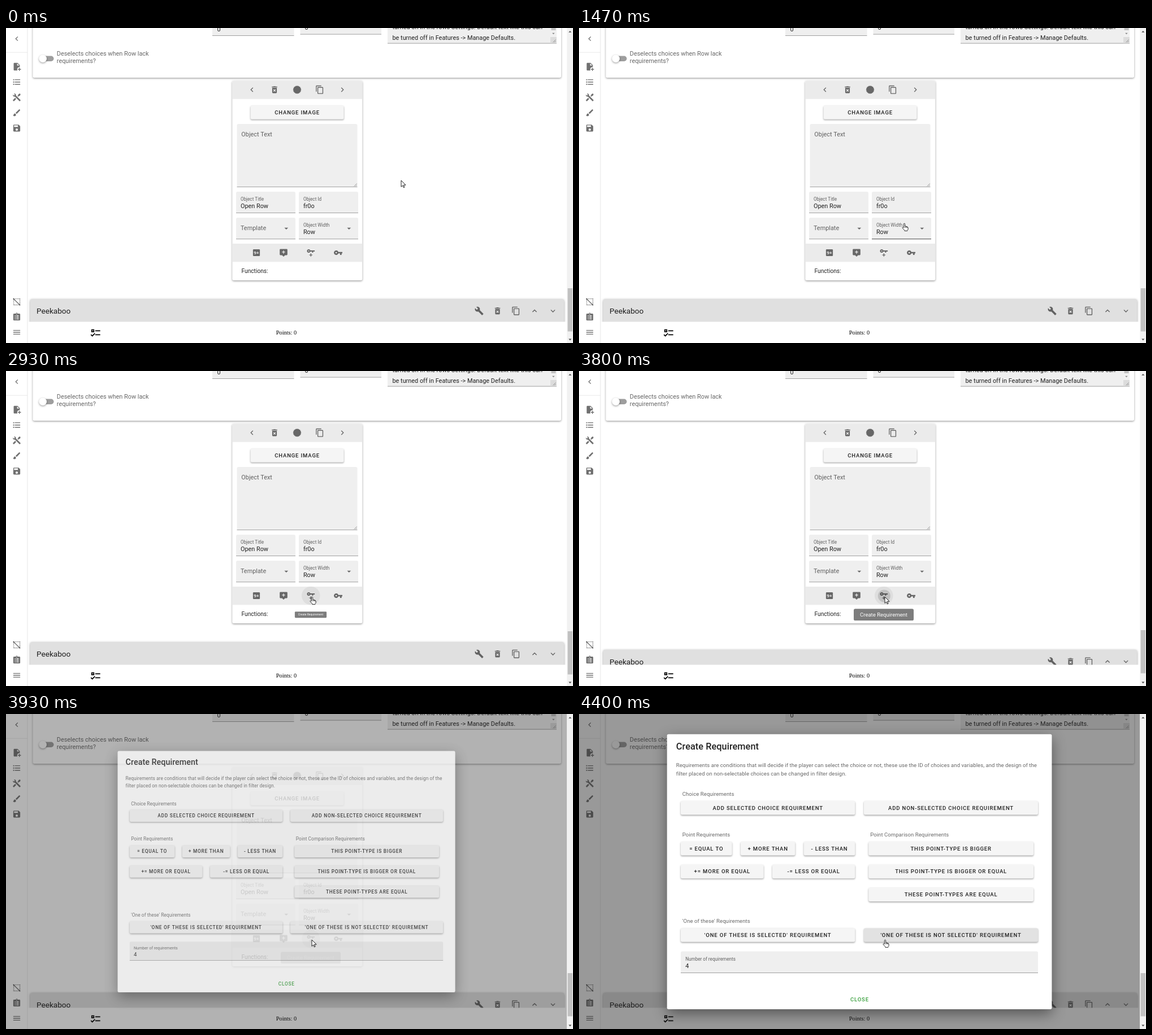
An HTML page with a canvas that plays this animation: 1003x558 px, repeating every 5990 ms.

```html
<!DOCTYPE html>
<html lang="en">
<head>
<meta charset="utf-8">
<title>Create Requirement</title>
<style>
html, body { margin: 0; width: 100%; height: 100%; overflow: hidden; background: #fff; }
canvas { display: block; width: 1003px; height: 558px; }
</style>
</head>
<body>
<canvas id="stage" width="1003" height="558"></canvas>
<script>
const W = 1003, H = 558, LOOP = 5990, STEP = 66.55;
const ROBOTO = 'Roboto, Arial, sans-serif';
const SERIF = '"Liberation Serif", "Times New Roman", serif';
const INK = 'rgba(0,0,0,.87)', SOFT = 'rgba(0,0,0,.6)', ICON = 'rgba(0,0,0,.56)';
const LINE = 'rgba(0,0,0,.42)', FIELD = '#efefef', BAR = '#ebebeb';
const BODY = 10.88, SMALL = 8.16, NOTE = 9.52;

const screen = document.getElementById('stage').getContext('2d');
const layer = document.createElement('canvas');
layer.width = W;
layer.height = H;
const layerCtx = layer.getContext('2d');
let g = screen;

const icons = {
  left: 'M15.4 16.6L10.8 12 15.4 7.4 14 6 8 12 14 18Z',
  right: 'M8.6 16.6L13.2 12 8.6 7.4 10 6 16 12 10 18Z',
  up: 'M7.4 15.4L12 10.8 16.6 15.4 18 14 12 8 6 14Z',
  down: 'M7.4 8.6L12 13.2 16.6 8.6 18 10 12 16 6 10Z',
  drop: 'M7 10L12 15 17 10Z',
  trash: 'M6 19A2 2 0 0 0 8 21H16A2 2 0 0 0 18 19V7H6ZM8.5 11.9L9.9 10.5 12 12.6 14.1 10.5 15.5 11.9 13.4 14 15.5 16.1 14.1 17.5 12 15.4 9.9 17.5 8.5 16.1 10.6 14ZM15.5 4L14.5 3H9.5L8.5 4H5V6H19V4Z',
  copy: 'M19 21H8V7H19ZM19 5H8A2 2 0 0 0 6 7V21A2 2 0 0 0 8 23H19A2 2 0 0 0 21 21V7A2 2 0 0 0 19 5ZM16 1H4A2 2 0 0 0 2 3V17H4V3H16Z',
  wrench: 'M22.7 19L13.6 9.9C14.5 7.6 14 4.9 12.1 3 10.1 1 7.1.6 4.7 1.7L9 6 6 9 1.6 4.7C.4 7.1.9 10.1 2.9 12.1 4.8 14 7.5 14.5 9.8 13.6L18.9 22.7Q19.6 23.3 20.3 22.7L22.6 20.4Q23.3 19.7 22.7 19Z',
  file: 'M14 2H6A2 2 0 0 0 4 4V20A2 2 0 0 0 6 22H13.8A6 6 0 0 1 20 13.1V8ZM13 9V3.5L18.5 9ZM23 20H20V23H18V20H15V18H18V15H20V18H23Z',
  list: 'M7 5H21V7H7ZM7 11H21V13H7ZM7 17H21V19H7ZM2.6 4.6H5.4V7.4H2.6ZM2.6 10.6H5.4V13.4H2.6ZM2.6 16.6H5.4V19.4H2.6Z',
  tools: 'M21.7 20.3L20.3 21.7A1 1 0 0 1 18.9 21.7L7 9.9A4 4 0 0 1 2.2 4.7L4.8 7.2 7.2 4.8 4.7 2.2A4 4 0 0 1 9.9 7L21.7 18.9A1 1 0 0 1 21.7 20.3ZM2.3 18.9A1 1 0 0 0 2.3 20.3L3.7 21.7A1 1 0 0 0 5.1 21.7L10.6 16.2 7.8 13.4ZM20 2L16 4V6L13.8 8.2 15.8 10.2 18 8H20L22 4Z',
  brush: 'M20.7 4.6L19.4 3.3Q18.7 2.6 18 3.3L9 12.3 11.8 15 20.7 6Q21.3 5.3 20.7 4.6ZM7 14A3 3 0 0 0 4 17C4 18.3 2.8 19 2 19 2.9 20.2 4.5 21 6 21A4 4 0 0 0 10 17A3 3 0 0 0 7 14Z',
  save: 'M15 9H5V5H15ZM12 19A3 3 0 0 1 12 13A3 3 0 0 1 12 19ZM17 3H5A2 2 0 0 0 3 5V19A2 2 0 0 0 5 21H19A2 2 0 0 0 21 19V7Z',
  board: 'M19 3H14.8A3 3 0 0 0 9.2 3H5A2 2 0 0 0 3 5V19A2 2 0 0 0 5 21H19A2 2 0 0 0 21 19V5A2 2 0 0 0 19 3ZM11 3H13V5H11ZM7 8H9V10H7ZM11 8H17V10H11ZM7 12H9V14H7ZM11 12H17V14H11ZM7 16H9V18H7ZM11 16H17V18H11Z',
  menu: 'M3 6H21V8H3ZM3 11H21V13H3ZM3 16H21V18H3Z',
  checks: 'M3 5H9V11H3ZM5 7V9H7V7ZM11 7H21V9H11ZM11 15H21V17H11ZM5 20L1.5 16.5 2.9 15.1 5 17.2 9.6 12.6 11 14Z',
  box: 'M5 3H19A2 2 0 0 1 21 5V19A2 2 0 0 1 19 21H5A2 2 0 0 1 3 19V5A2 2 0 0 1 5 3Z',
  note: 'M4 2H20A2 2 0 0 1 22 4V16A2 2 0 0 1 20 18H16L12 22 8 18H4A2 2 0 0 1 2 16V4A2 2 0 0 1 4 2ZM11 6V9H8V11H11V14H13V11H16V9H13V6Z',
  keyPlus: 'M6.5 3A4.5 4.5 0 0 1 10.7 6H22V9H18V12H15V9H10.7A4.5 4.5 0 1 1 6.5 3ZM6.5 6A1.5 1.5 0 0 0 6.5 9A1.5 1.5 0 0 0 6.5 6ZM8 17H11V14H13V17H16V19H13V22H11V19H8Z',
  key: 'M7 14A2 2 0 0 1 7 10A2 2 0 0 1 7 14ZM12.7 10A6 6 0 1 0 12.7 14H17V18H21V14H23V10Z'
};
for (const name in icons) icons[name] = new Path2D(icons[name]);

const arrow = new Path2D('M0 0V17L4 13.3 6.5 19 9 18 6.5 12.2H12Z');
const hand = new Path2D('M5 12V2.5a1.8 1.8 0 0 1 3.6 0V8.5q3.2-.8 3.4 1.2q2.8-.6 3 1.4q2.4-.2 2.4 2v3.5q0 2.5-2 4V22H7.5v-1.5L2 14.5q-1.6-2.2.2-3q1.5-.4 2.8 1.5Z');

// step, x, y of the pointer
const path = [
  [12, 699, 270], [13, 697, 270], [14, 688, 268], [15, 671, 265], [17, 624, 264],
  [18, 610, 267], [19, 601, 277], [20, 593, 298], [21, 584, 325], [22, 575, 346],
  [24, 559, 377], [25, 553, 388], [26, 548, 394], [27, 544, 398], [29, 541, 400]
];

// y is the middle of the capitals
function text(s, x, y, size, color = INK, o = {}) {
  g.font = `${o.weight || 400} ${size}px ${o.font || ROBOTO}`;
  g.letterSpacing = (o.space || 0) + 'px';
  g.textAlign = o.align || 'left';
  g.fillStyle = color;
  g.fillText(s, x, y + size * .356);
}

function rect(x1, y1, x2, y2, color) {
  g.fillStyle = color;
  g.fillRect(x1, y1, x2 - x1, y2 - y1);
}

function panel(x1, y1, x2, y2, color, r = 2.7, blur = 0, drop = 0, dark = .35) {
  g.save();
  if (blur) {
    g.shadowColor = `rgba(0,0,0,${dark})`;
    g.shadowBlur = blur;
    g.shadowOffsetY = drop;
  }
  g.fillStyle = color;
  g.beginPath();
  g.roundRect(x1, y1, x2 - x1, y2 - y1, r);
  g.fill();
  g.restore();
}

function disc(x, y, r, color) {
  g.fillStyle = color;
  g.beginPath();
  g.arc(x, y, r, 0, 7);
  g.fill();
}

function icon(name, x, y, color = ICON, size = 16.32) {
  g.save();
  g.translate(x, y);
  g.scale(size / 24, size / 24);
  g.translate(-12, -12);
  g.fillStyle = color;
  g.fill(icons[name], 'evenodd');
  g.restore();
}

function button(s, x1, x2, y, color = '#f5f5f5') {
  panel(x1, y - 12.2, x2, y + 12.2, color, 2.7, 3, 1.4, .36);
  text(s, (x1 + x2) / 2, y, NOTE, INK, { weight: 500, space: .85, align: 'center' });
}

function field(x1, y1, x2, y2, hot) {
  panel(x1, y1, x2, y2, FIELD, [2.7, 2.7, 0, 0]);
  rect(x1, y2 - .8, x2, y2, hot ? INK : LINE);
}

function grip(x, y) {
  g.strokeStyle = '#777';
  g.lineWidth = .7;
  g.beginPath();
  for (const d of [5, 2.5]) {
    g.moveTo(x - d, y);
    g.lineTo(x, y - d);
  }
  g.stroke();
}

function triangle(x, y, w, h, color) {
  g.fillStyle = color;
  g.beginPath();
  g.moveTo(x - w, y - h);
  g.lineTo(x + w, y - h);
  g.lineTo(x, y + h);
  g.fill();
}

function sidebar() {
  rect(0, 0, 38, H, '#fff');
  rect(37.6, 0, 38.3, H, '#dcdcdc');
  rect(0, 42.8, 38, 43.5, '#e0e0e0');
  icon('left', 19, 19);
  ['file', 'list', 'tools', 'brush', 'save'].forEach((n, i) => icon(n, 19, 68.5 + i * 27.2));
  g.strokeStyle = ICON;
  g.lineWidth = 1.4;
  g.setLineDash([1.4, 1.32]);
  g.strokeRect(13.6, 479.6, 10.9, 10.9);
  g.setLineDash([]);
  g.beginPath();
  g.moveTo(12.7, 479);
  g.lineTo(25, 491.3);
  g.stroke();
  icon('board', 19, 512);
  icon('menu', 19, 539);
}

function topSheet() {
  panel(47.5, -20, 982, 88, '#fff', 2.7, 3.5, 1.3, .4);
  field(365, -20, 509.5, 14);
  field(520.5, -20, 664, 11.5);
  text('0', 373.5, 2.2, BODY);
  text('0', 528.5, -.8, BODY);
  field(675, -20, 974, 27.5);
  text('turned on in the rows Settings. Default text like this can', 683.5, -1.8, BODY);
  text('be turned off in Features -> Manage Defaults.', 683.5, 17.3, BODY);
  rect(963, 0, 974, 16, '#f1f1f1');
  rect(964.5, 0, 972.5, 4, '#c1c1c1');
  triangle(968.4, 10, 2.3, 1.2, '#888');
  rect(963, 16, 974, 26.7, '#dcdcdc');
  grip(972.5, 25.5);
  panel(62, 49.5, 84.5, 59, '#9e9e9e', 4.7);
  g.save();
  g.shadowColor = 'rgba(0,0,0,.4)';
  g.shadowBlur = 3.5;
  g.shadowOffsetY = 1.3;
  disc(65.2, 54.2, 6.8, '#fff');
  g.restore();
  text('Deselects choices when Row lack', 89.8, 44.7, BODY, SOFT);
  text('requirements?', 89.8, 58.3, BODY, SOFT);
}

function badge(x, y) {
  g.fillStyle = ICON;
  g.beginPath();
  for (let i = 0; i < 32; i++) {
    const r = i % 2 ? 6.5 : 7.4, a = i * Math.PI / 16;
    g.lineTo(x + r * Math.cos(a), y + r * Math.sin(a));
  }
  g.fill();
}

function card(k, hot) {
  panel(400.3, 93.5, 630.3, 447, '#fff', 2.7, 3.5, 1.3, .42);
  panel(400.3, 93.5, 630.3, 125.7, BAR, [2.7, 2.7, 0, 0]);
  icon('left', 435, 109.3);
  icon('trash', 475, 109.3);
  badge(515, 109.3);
  icon('copy', 555, 109.3);
  icon('right', 595, 109.3);
  button('CHANGE IMAGE', 432.7, 597.5, 149.5);

  field(408.5, 170, 621.5, 281.8, hot === 'area');
  text('Object Text', 416.3, 188.4, BODY, SOFT);
  grip(620.8, 280.4);
  field(407, 290, 512, 328);
  text('Object Title', 414.9, 302.6, SMALL, SOFT);
  text('Open Row', 414.9, 315.2, BODY);
  field(518, 290, 623, 328, hot === 'id');
  text('Object Id', 525.9, 302.6, SMALL, SOFT);
  text('fr0o', 525.9, 315.2, BODY);
  field(407, 336, 512, 374.2);
  text('Template', 414.9, 354.6, BODY, SOFT);
  icon('drop', 495.8, 355);
  field(518, 336, 623, 374.2, hot === 'width');
  text('Object Width', 525.9, 349, SMALL, SOFT);
  text('Row', 525.9, 361.6, BODY);
  icon('drop', 606.8, 355);

  rect(400.3, 382, 630.3, 414.3, BAR);
  icon('box', 443, 398);
  text('9+', 442.8, 398.1, 8, BAR, { weight: 700, align: 'center' });
  icon('note', 491, 398.3);
  const hover = Math.max(0, Math.min(1, (k - 25) / 4));
  if (hover) disc(539.3, 398, 16.3, `rgba(0,0,0,${.055 * hover})`);
  if (k >= 57) disc(539.8, 398.4, k > 57 ? 16 : 11, `rgba(0,0,0,${k > 57 ? .05 : .13})`);
  icon('keyPlus', 539.3, 398);
  icon('key', 587.5, 398);
  text('Functions:', 416.5, 430.6, 10.2);
}

function peekaboo(y) {
  panel(43, y - 21, 987, y + 60, '#e0e0e0', 2.7, 4, 1.2, .38);
  text('Peekaboo', 54, y + .4, 13.6);
  icon('wrench', 837, y);
  icon('trash', 869.5, y);
  icon('copy', 902, y);
  icon('up', 935, y);
  icon('down', 967.5, y);
}

function footer() {
  rect(38, 520.4, 992, H, '#fff');
  icon('checks', 158.8, 539.8, '#000', 21);
  text('Points: 0', 496, 539.8, 10.3, '#000', { font: SERIF, align: 'center' });
}

function scrollbar(top) {
  rect(992.3, 0, W, H, '#f1f1f1');
  rect(993.6, top, 1002, top + 76.5, '#c1c1c1');
  triangle(997.8, 6.3, 2.6, -1.4, '#505050');
  triangle(997.8, 552, 2.6, 1.4, '#505050');
}

function tooltip(k) {
  if (k < 44 || k > 60) return;
  const size = [.53, .87, .97, .995][k - 44] || 1;
  g.save();
  g.globalAlpha = k > 58 ? .5 : 1;
  g.translate(539, 431.7);
  g.scale(size, size);
  panel(-53, -10.4, 53, 10.4, 'rgba(97,97,97,.82)');
  text('Create Requirement', 0, 0, NOTE, '#fff', { align: 'center' });
  g.restore();
}

function dialog(k) {
  const caption = (s, x, y) => text(s, x, y, NOTE, SOFT, { space: .068 });
  panel(155.7, 35.7, 836.4, 523, '#fff', 2.7, 24, 8, .45);
  text('Create Requirement', 171.8, 57.3, 16.32, INK, { weight: 500, space: .05 });
  caption('Requirements are conditions that will decide if the player can select the choice or not, these use the ID of choices and variables, and the design of the', 171.8, 90.4);
  caption('filter placed on non-selectable choices can be changed in filter design.', 171.8, 105.2);
  caption('Choice Requirements', 182.8, 141.7);
  button('ADD SELECTED CHOICE REQUIREMENT', 180, 488.3, 166.3);
  button('ADD NON-SELECTED CHOICE REQUIREMENT', 504, 812, 166.3);
  caption('Point Requirements', 182.8, 213.3);
  caption('Point Comparison Requirements', 515.2, 213.3);
  button('= EQUAL TO', 180, 270.7, 238.3);
  button('+ MORE THAN', 286, 382.3, 238.3);
  button('- LESS THAN', 397.7, 488.3, 238.3);
  button('+= MORE OR EQUAL', 180, 326.6, 279);
  button('-= LESS OR EQUAL', 342, 488.3, 279);
  button('THIS POINT-TYPE IS BIGGER', 512.3, 804, 238.3);
  button('THIS POINT-TYPE IS BIGGER OR EQUAL', 512.3, 804, 279);
  button('THESE POINT-TYPES ARE EQUAL', 512.3, 804, 319.8);
  caption("'One of these' Requirements", 182.8, 366.8);
  button("'ONE OF THESE IS SELECTED' REQUIREMENT", 180, 488.3, 391.6);
  const tone = k > 65 ? '#e2e2e2' : k > 63 ? '#ebebeb' : '#f5f5f5';
  button("'ONE OF THESE IS NOT SELECTED' REQUIREMENT", 504, 812, 391.6, tone);
  field(180, 420.5, 812, 459);
  text('Number of requirements', 188.2, 433.6, SMALL, SOFT);
  text('4', 188.2, 446.2, BODY);
  text('CLOSE', 496.4, 505.8, NOTE, '#379f3b', { weight: 500, space: .85, align: 'center' });
}

// cubic-bezier(.25, .8, .25, 1)
function ease(x) {
  if (x <= 0) return 0;
  if (x >= 1) return 1;
  const curve = (u, a, b) => 3 * (1 - u) * (1 - u) * u * a + 3 * (1 - u) * u * u * b + u * u * u;
  let lo = 0, hi = 1;
  for (let i = 0; i < 20; i++) {
    const mid = (lo + hi) / 2;
    if (curve(mid, .25, .25) < x) lo = mid; else hi = mid;
  }
  return curve(lo, .8, 1);
}

function pointer(k) {
  if (k <= path[0][0]) return path[0].slice(1);
  for (let i = 1; i < path.length; i++) {
    const [k1, x1, y1] = path[i - 1], [k2, x2, y2] = path[i];
    if (k <= k2) {
      const f = (k - k1) / (k2 - k1);
      return [x1 + (x2 - x1) * f, y1 + (y2 - y1) * f];
    }
  }
  return path[path.length - 1].slice(1);
}

function under(x, y) {
  const inside = (x1, y1, x2, y2) => x > x1 && x < x2 && y > y1 && y < y2;
  if (inside(408, 170, 621, 282)) return 'area';
  if (inside(518, 290, 623, 328)) return 'id';
  if (inside(518, 336, 623, 374)) return 'width';
  return Math.hypot(x - 539.3, y - 398) < 16 ? 'key' : '';
}

function cursor(x, y, hot, k) {
  g.save();
  g.translate(x, y);
  g.strokeStyle = '#000';
  if (hot === 'area' || hot === 'id') {
    g.lineWidth = .8;
    g.beginPath();
    for (const s of [-1, 1]) {
      g.moveTo(-2.4, 6 * s);
      g.lineTo(2.4, 6 * s);
    }
    g.moveTo(0, -6);
    g.lineTo(0, 6);
    g.stroke();
  } else {
    const pointing = hot && (k < 57 || k > 63);
    g.scale(pointing ? .62 : .67, pointing ? .62 : .67);
    if (pointing) g.translate(-6, -.4);
    const shape = pointing ? hand : arrow;
    g.fillStyle = '#fff';
    g.lineWidth = 1.3;
    g.lineJoin = 'round';
    g.fill(shape);
    g.stroke(shape);
    if (pointing) {
      g.beginPath();
      for (const px of [8.6, 11.8, 14.8]) {
        g.moveTo(px, 9.5);
        g.lineTo(px, 13);
      }
      g.stroke();
    }
  }
  g.restore();
}

function draw(k) {
  const [x, y] = pointer(k), hot = under(x, y), moved = k >= 57;
  g = screen;
  rect(0, 0, W, H, '#fff');
  topSheet();
  card(k, hot);
  peekaboo(moved ? 514.7 : 501.2);
  footer();
  sidebar();
  tooltip(k);

  const shown = ease((k * 66.67 - 3850) / 300);
  if (shown) {
    rect(0, 0, 992.3, H, `rgba(33,33,33,${.46 * shown})`);
    const size = .5 + shown / 2;
    g = layerCtx;
    g.clearRect(0, 0, W, H);
    g.save();
    g.translate(496, 279.3);
    g.scale(size, size);
    g.translate(-496, -279.3);
    dialog(k);
    g.restore();
    g = screen;
    g.globalAlpha = shown;
    g.drawImage(layer, 0, 0);
    g.globalAlpha = 1;
  }
  scrollbar(moved ? 459 : 461);
  cursor(x, y, hot, k);
}

const start = performance.now();
function tick() {
  const t = (performance.now() - start) % LOOP;
  draw(Math.floor(t / STEP));
  requestAnimationFrame(tick);
}
tick();
</script>
</body>
</html>
```
